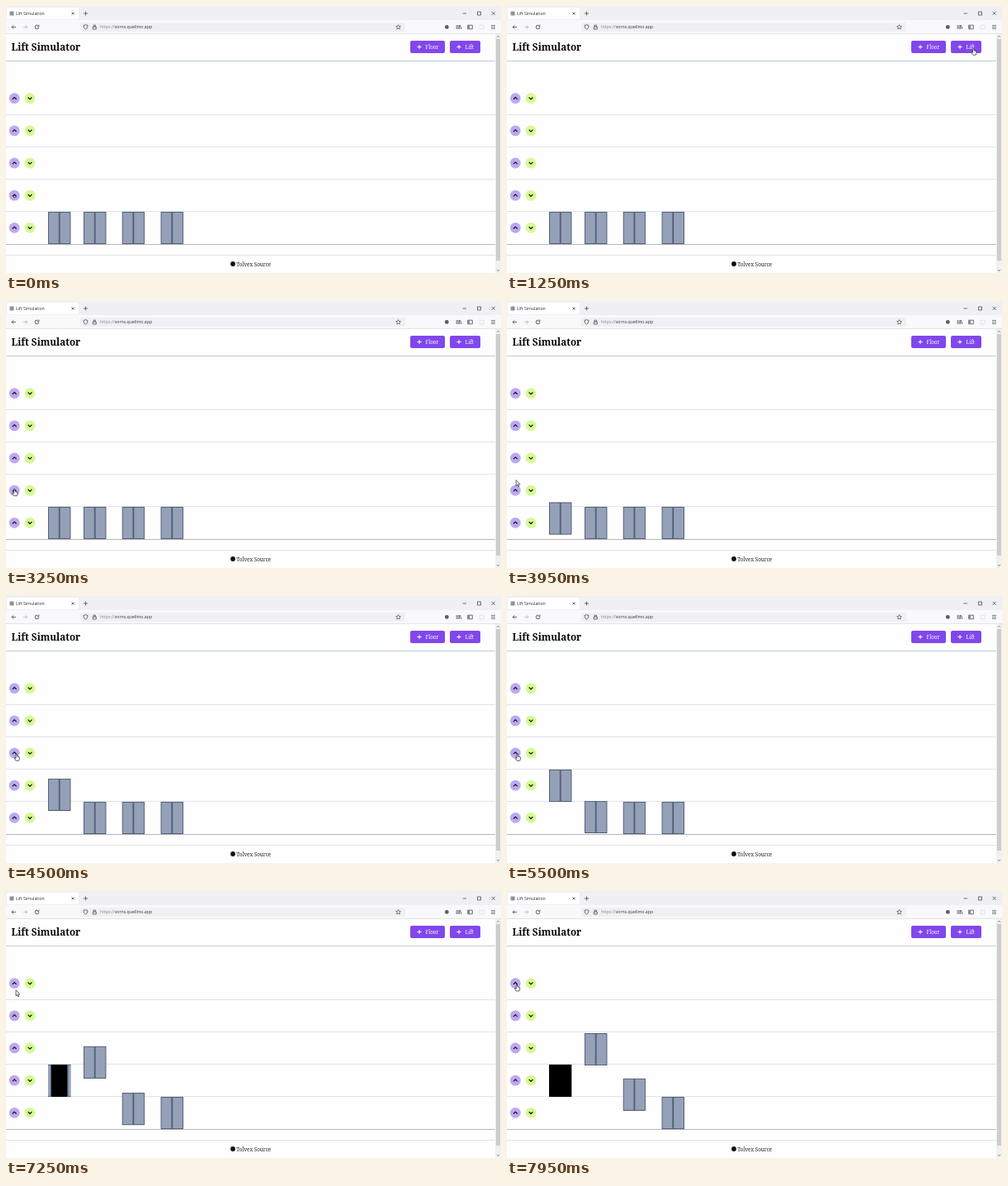
These frames come from a looping animation (600 px wide and 323 px high, 8000 ms). An HTML page with a canvas:

```html
<!DOCTYPE html>
<html lang="en">
<head>
<meta charset="utf-8">
<title>Lift Simulation</title>
<style>
html, body { margin: 0; width: 100%; height: 100%; overflow: hidden; background: #fff; }
canvas { display: block; width: 100vw; height: 100vh; }
</style>
</head>
<body>
<canvas id="stage" width="600" height="323"></canvas>
<script>
const canvas = document.getElementById('stage');
const ctx = canvas.getContext('2d');
const LOOP = 8000;
const FLOOR_H = 39;
const FLOOR_MS = 1470;
const GROUND = 249;
const SERIF = '"Noto Serif", serif';
const SANS = '"Open Sans", "Noto Sans", sans-serif';
const INK = '#4a4a50';

const lifts = [
  { x: 51, floors: 1, start: 3570, doors: 6130 },
  { x: 94, floors: 2, start: 5256 },
  { x: 140.7, floors: 3, start: 6620 },
  { x: 187.6, floors: 0, start: 0 }
];

// Pointer stops: arrive, leave, x, y, shape
const stops = [
  { from: 0, to: 100, x: 9.5, y: 228.5, small: true },
  { from: 850, to: 1750, x: 565.5, y: 51 },
  { from: 2700, to: 3800, x: 10.3, y: 227.5 },
  { from: 4200, to: 5550, x: 12.8, y: 191 },
  { from: 6050, to: 6900, x: 12.2, y: 151.2 },
  { from: 7400, to: 8000, x: 12, y: 112.8 }
];

const clamp = v => Math.max(0, Math.min(1, v));

// cubic-bezier(.42, 0, .58, 1)
function easeInOut(v) {
  const x = clamp(v);
  let lo = 0, hi = 1;
  for (let i = 0; i < 24; i++) {
    const s = (lo + hi) / 2, r = 1 - s;
    if (1.26 * r * r * s + 1.74 * r * s * s + s * s * s < x) lo = s; else hi = s;
  }
  return lo * lo * (3 - 2 * lo);
}

function rect(x, y, w, h, fill) {
  ctx.fillStyle = fill;
  ctx.fillRect(x, y, w, h);
}

function round(x, y, w, h, r, fill) {
  ctx.fillStyle = fill;
  ctx.beginPath();
  ctx.roundRect(x, y, w, h, r);
  ctx.fill();
}

function disc(x, y, r, fill) {
  ctx.fillStyle = fill;
  ctx.beginPath();
  ctx.arc(x, y, r, 0, Math.PI * 2);
  ctx.fill();
}

function line(points, color, width = 1) {
  ctx.strokeStyle = color;
  ctx.lineWidth = width;
  ctx.beginPath();
  points.forEach(([x, y], i) => i ? ctx.lineTo(x, y) : ctx.moveTo(x, y));
  ctx.stroke();
}

function box(x, y, w, h, color, width = 0.8) {
  ctx.strokeStyle = color;
  ctx.lineWidth = width;
  ctx.strokeRect(x, y, w, h);
}

function text(str, x, y, font, color) {
  ctx.font = font;
  ctx.fillStyle = color;
  ctx.fillText(str, x, y);
}

function plus(x, y, r, color, width) {
  line([[x - r, y], [x + r, y]], color, width);
  line([[x, y - r], [x, y + r]], color, width);
}

function cross(x, y, r, color) {
  line([[x - r, y - r], [x + r, y + r]], color, 0.8);
  line([[x - r, y + r], [x + r, y - r]], color, 0.8);
}

function drawTabs() {
  rect(0, 0, 600, 17, '#f0f0f4');
  round(1, 2, 87, 14, 2, '#ffffff');
  rect(4.5, 6.5, 5, 5, '#8d9298');
  text('Lift Simulation', 12, 11, '5.2px ' + SANS, '#2a2a32');
  cross(81, 9, 1.5, INK);
  plus(96.5, 9, 2.5, INK, 0.8);
  line([[553.5, 9], [558, 9]], INK, 0.8);
  box(571.5, 7, 4, 4, INK);
  cross(590.7, 8.8, 2, INK);
}

function drawNav() {
  rect(0, 17, 600, 16, '#f9f9fb');
  rect(0, 33, 600, 1, '#e4e4e8');
  round(90, 20, 394, 11, 2, '#f0f0f4');

  line([[12, 25.5], [7, 25.5]], INK, 0.8);
  line([[9.3, 23.2], [7, 25.5], [9.3, 27.8]], INK, 0.8);
  line([[21, 25.5], [26, 25.5]], '#b4b4ba', 0.8);
  line([[23.7, 23.2], [26, 25.5], [23.7, 27.8]], '#b4b4ba', 0.8);
  ctx.strokeStyle = INK;
  ctx.lineWidth = 0.9;
  ctx.beginPath();
  ctx.arc(37.5, 25.5, 2.3, 0, 5.2);
  ctx.stroke();
  line([[39.9, 22.6], [39.9, 24.6], [37.9, 24.6]], INK, 0.8);

  line([[96.5, 22.7], [99, 23.5], [98.6, 26.2], [96.5, 28.4], [94.4, 26.2], [94, 23.5], [96.5, 22.7]], INK, 0.8);
  box(105.3, 25.2, 4, 2.8, INK);
  line([[106.2, 25], [106.2, 23.2], [108.4, 23.2], [108.4, 25]], INK, 0.8);

  const font = '5.2px ' + SANS;
  text('https://', 114, 27.4, font, '#85858c');
  const w = ctx.measureText('https://').width;
  text('vorns.quellmo.app', 114 + w, 27.4, font, '#33333a');

  const star = [];
  for (let i = 0; i <= 10; i++) {
    const a = i * Math.PI / 5 - Math.PI / 2, r = i % 2 ? 1.4 : 3;
    star.push([475.5 + r * Math.cos(a), 25.6 + r * Math.sin(a)]);
  }
  line(star, INK, 0.7);

  disc(534.3, 25.4, 2.4, '#5b5b63');
  [546.2, 548, 549.6].forEach(x => line([[x, 23], [x, 28]], INK, 0.8));
  line([[550.4, 23.2], [552, 28]], INK, 0.8);
  box(559.7, 23.2, 5.6, 4.6, INK);
  rect(560, 23.5, 2, 4, '#85858c');
  box(574, 23.2, 5, 4.6, '#e0e0e4');
  [23.5, 25.5, 27.5].forEach(y => line([[588, y], [593, y]], INK, 0.7));
}

function drawScrollbar() {
  rect(593, 34, 7, 289, '#f0f0f0');
  rect(594, 40, 5, 268, '#cdcdcd');
  line([[595, 37.7], [596.5, 36.2], [598, 37.7]], '#606060', 0.8);
  line([[595, 319], [596.5, 320.5], [598, 319]], '#606060', 0.8);
}

function drawButton(x, w, label) {
  round(x, 42, w, 15, 2, '#8147ec');
  plus(x + 11, 49.5, 2.5, '#fff', 1);
  text(label, x + 18.5, 52, '6.3px ' + SERIF, '#fff');
}

function drawCall(x, y, fill, dir) {
  disc(x, y, 6.4, fill);
  line([[x - 2.4, y + dir * 1.2], [x, y - dir * 1.2], [x + 2.4, y + dir * 1.2]], '#111', 1.2);
}

function drawPage() {
  rect(0, 34, 593, 289, '#fefeff');
  text('Lift Simulator', 6.5, 54, 'bold 11.7px ' + SERIF, '#080808');
  drawButton(490, 42, 'Floor');
  drawButton(538, 37, 'Lift');
  rect(0, 66, 593, 1, '#bccbdc');
  [131, 170, 209, 248].forEach(y => rect(0, y, 593, 1, '#dfe3e9'));
  rect(0, 288, 593, 1, '#b5b7bc');
  rect(0, 301, 593, 1, '#dfe2e7');
  for (let i = 0; i < 5; i++) {
    const y = 111.7 + i * 39.15;
    drawCall(10.2, y, '#bda8f3', 1);
    drawCall(29, y, '#d5fa93', -1);
  }
  disc(275, 312, 2.9, '#111');
  text('Tolvex Source', 279.3, 314.5, '6.3px ' + SERIF, '#222');
}

function drawLift(lift, t) {
  const span = lift.floors * FLOOR_MS || 1;
  const y = GROUND - lift.floors * FLOOR_H * easeInOut((t - lift.start) / span);
  const open = lift.doors ? easeInOut((t - lift.doors) / 1780) : 0;
  const w = 27.4, half = w / 2;
  ctx.save();
  ctx.beginPath();
  ctx.rect(lift.x, y, w, FLOOR_H);
  ctx.clip();
  rect(lift.x, y, w, FLOOR_H, '#000');
  [[0, -1], [half, 1]].forEach(([dx, dir]) => {
    const x = lift.x + dx + dir * open * half;
    rect(x, y, half, FLOOR_H, '#94a1b8');
    box(x + 0.4, y + 0.4, half - 0.8, FLOOR_H - 0.8, '#3c495f');
  });
  ctx.restore();
}

function pointerShape(points, x, y) {
  ctx.beginPath();
  points.forEach(([px, py], i) => ctx[i ? 'lineTo' : 'moveTo'](x + px, y + py));
  ctx.closePath();
  ctx.fillStyle = '#fff';
  ctx.fill();
  ctx.strokeStyle = '#222';
  ctx.lineWidth = 0.7;
  ctx.lineJoin = 'round';
  ctx.stroke();
}

const HAND = [[-0.8, 0.2], [0.5, 0.2], [0.7, 3], [3.4, 3.7], [3.6, 6], [2.8, 8.2], [-0.8, 8.2], [-2.8, 5], [-2.2, 4.4], [-0.8, 5.4]];
const ARROW = [[0, 0], [0, 7], [1.6, 5.6], [2.6, 8], [3.6, 7.6], [2.6, 5.2], [4.8, 5]];
const SMALL = [[0, 0], [0, 3.6], [2.6, 2.6]];

function drawPointer(t) {
  const i = stops.findLastIndex(s => t >= s.from);
  const a = stops[i], b = stops[i + 1];
  if (t <= a.to || !b) {
    pointerShape(a.small ? SMALL : HAND, a.x, a.y);
    return;
  }
  const k = easeInOut((t - a.to) / (b.from - a.to));
  pointerShape(ARROW, a.x + (b.x - a.x) * k, a.y + (b.y - a.y) * k);
}

function frame(now) {
  const t = now % LOOP;
  drawPage();
  drawTabs();
  drawNav();
  drawScrollbar();
  lifts.forEach(lift => drawLift(lift, t));
  drawPointer(t);
}

const began = performance.now();
function tick() {
  frame(performance.now() - began);
  requestAnimationFrame(tick);
}
tick();
</script>
</body>
</html>
```
